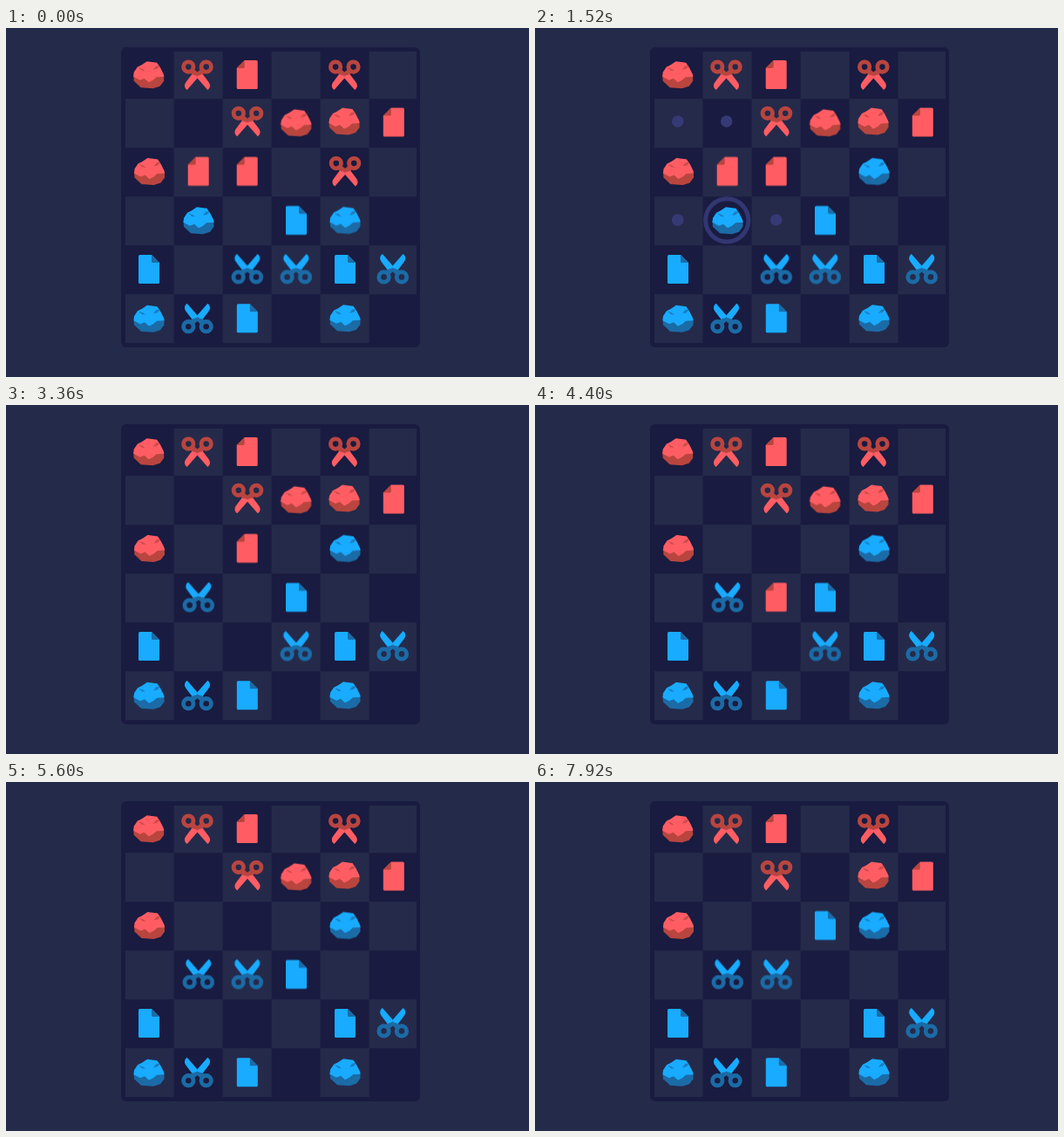
These frames come from a looping animation (600 by 400 pixels, 8 s). An HTML page without scripts:

```html
<!DOCTYPE html>
<html lang="en">
<head>
<meta charset="utf-8">
<title>Rock paper scissors board</title>
<style>
html, body { margin: 0; width: 100%; height: 100%; overflow: hidden; background: #242a49; }
svg { display: block; width: 600px; height: 400px; }

.red { color: #ff5d63; --shade: #b9453f; }
.blue { color: #18abff; --shade: #1b6ba6; }
.light { fill: currentColor; }
.shade { fill: var(--shade); }
.loop { stroke: var(--shade); stroke-width: 4.8; fill: none; }

.hint { fill: #353a76; visibility: hidden; }
.ring { fill: none; stroke: #323772; stroke-width: 5; }

/* Every turn cuts hard: hints show, then the piece jumps and captures. */
.act { animation: 8s step-end -4ms infinite; }
.hint.t1 { animation-name: hint1; }
.hint.t2 { animation-name: hint2; }
.hint.t3 { animation-name: hint3; }
.hint.t4 { animation-name: hint4; }
.hint.t5 { animation-name: hint5; }
.hint.t6 { animation-name: hint6; }
.hint.t7 { animation-name: hint7; }
@keyframes hint1 { 0% { visibility: hidden } 1% { visibility: visible } 9% { visibility: hidden } }
@keyframes hint2 { 0% { visibility: hidden } 19% { visibility: visible } 24% { visibility: hidden } }
@keyframes hint3 { 0% { visibility: hidden } 29% { visibility: visible } 39% { visibility: hidden } }
@keyframes hint4 { 0% { visibility: hidden } 48% { visibility: visible } 55% { visibility: hidden } }
@keyframes hint5 { 0% { visibility: hidden } 63% { visibility: visible } 70% { visibility: hidden } }
@keyframes hint6 { 0% { visibility: hidden } 77% { visibility: visible } 83% { visibility: hidden } }
@keyframes hint7 { 0% { visibility: hidden } 91% { visibility: visible } 98% { visibility: hidden } }

.move1 { animation-name: move1; }
.move2 { animation-name: move2; }
.move3 { animation-name: move3; }
.move4 { animation-name: move4; }
.move5 { animation-name: move5; }
.move6 { animation-name: move6; }
.move7 { animation-name: move7; }
.lost1 { animation-name: lost1; }
.lost2 { animation-name: lost2; }
@keyframes move1 { 0% { transform: none } 9% { transform: translate(0, -56px) } }
@keyframes move2 {
  0% { transform: none; visibility: visible }
  24% { transform: translate(0, 56px); visibility: visible }
  39% { transform: translate(0, 56px); visibility: hidden }
}
@keyframes move3 { 0% { transform: none } 39% { transform: translate(-56px, -56px) } }
@keyframes move4 {
  0% { transform: none; visibility: visible }
  55% { transform: translate(0, 56px); visibility: visible }
  70% { transform: translate(0, 56px); visibility: hidden }
}
@keyframes move5 { 0% { transform: none } 70% { transform: translate(-56px, -56px) } }
@keyframes move6 {
  0% { transform: none; visibility: visible }
  83% { transform: translate(0, 56px); visibility: visible }
  98% { transform: translate(0, 56px); visibility: hidden }
}
@keyframes move7 { 0% { transform: none } 98% { transform: translate(0, -56px) } }
@keyframes lost1 { 0% { visibility: visible } 9% { visibility: hidden } }
@keyframes lost2 { 0% { visibility: visible } 24% { visibility: hidden } }
</style>
</head>
<body>
<svg viewBox="0 0 600 400">
  <defs>
    <pattern id="checker" x="136.6" y="25.2" width="112" height="112" patternUnits="userSpaceOnUse">
      <path fill="#252a4a" d="M56 0h56v56h-56zM0 56h56v56h-56z"/>
    </pattern>
    <g id="rock">
      <path class="shade" d="M-17.5 0L-17 7-9 14.5 5 15.5 13 13 17.5 7 17.5 0Z"/>
      <path class="light" d="M-17.5 2L-17-3-13-9-8-11.5-2-15.5 9.5-14 13.5-8 17-1 17.5 2 9 2.5 5 6 0 8.5-5 4-10 6Z"/>
      <path class="shade" opacity=".7" d="M5-6L8-10 13-11 10-7ZM-12-8.5L-7-7-4-4.5-8-5Z"/>
    </g>
    <g id="paper">
      <path class="light" d="M-10.5-16.5H3L12-7.5V15q0 1.5-1.5 1.5h-21q-1.5 0-1.5-1.5V-15q0-1.5 1.5-1.5Z"/>
      <path class="shade" d="M3-16.5L12-7.5H4.5Q3-7.5 3-9Z"/>
    </g>
    <g id="scissors">
      <path class="shade" d="M-5-1L0-4 5-1 10 4 6 8 0 3-6 8-10 4Z"/>
      <circle class="loop" cx="-10.2" cy="8.9" r="5.7"/>
      <circle class="loop" cx="10.2" cy="8.9" r="5.7"/>
      <path id="blade" class="light" d="M-11.8-17.5C-15.2-15-15.2-11.5-13-8.5L-6.2 .5 0-1.5V-4Z"/>
      <use href="#blade" transform="scale(-1 1)"/>
    </g>
    <g id="paper-flip"><use href="#paper" transform="scale(-1 1)"/></g>
    <g id="scissors-flip"><use href="#scissors" transform="scale(1 -1)"/></g>
    <circle id="dot" r="6.8"/>
    <circle id="ring" class="ring" r="24.6"/>
  </defs>

  <rect x="132" y="22" width="343" height="344" rx="6" fill="#191b40"/>
  <rect x="137" y="27" width="334" height="334" fill="url(#checker)"/>

  <g class="act hint t1">
    <use href="#dot" x="332" y="164"/><use href="#dot" x="444" y="164"/>
    <use href="#dot" x="444" y="220"/><use href="#ring" x="388" y="165"/>
  </g>
  <g class="act hint t2">
    <use href="#dot" x="163.7" y="107"/><use href="#dot" x="219.7" y="107"/>
    <use href="#dot" x="163.7" y="220"/><use href="#dot" x="276.7" y="220"/>
    <use href="#ring" x="220.3" y="220.3"/>
  </g>
  <g class="act hint t3">
    <use href="#dot" x="276.7" y="220"/><use href="#dot" x="220" y="277"/>
    <use href="#dot" x="332" y="333"/><use href="#ring" x="220.3" y="220.3"/>
  </g>
  <g class="act hint t4">
    <use href="#dot" x="219.7" y="107"/><use href="#dot" x="220" y="164"/>
    <use href="#dot" x="332" y="164"/><use href="#dot" x="276.7" y="220"/>
  </g>
  <g class="act hint t5">
    <use href="#dot" x="388" y="220"/><use href="#dot" x="276.7" y="277"/>
    <use href="#dot" x="332" y="333"/><use href="#ring" x="276.5" y="220.3"/>
  </g>
  <g class="act hint t6">
    <use href="#dot" x="332" y="54"/><use href="#dot" x="276.7" y="164"/>
    <use href="#dot" x="332" y="164"/>
  </g>
  <g class="act hint t7">
    <use href="#dot" x="276.7" y="164"/><use href="#dot" x="388" y="220"/>
    <use href="#dot" x="276.7" y="277"/><use href="#dot" x="332" y="277"/>
    <use href="#ring" x="332.5" y="165"/>
  </g>

  <g class="red">
    <use href="#rock" x="163.7" y="53.7"/>
    <use href="#scissors-flip" x="219.5" y="53.5"/>
    <use href="#paper-flip" x="276.7" y="53.5"/>
    <use href="#scissors-flip" x="388.3" y="53.5"/>
    <use href="#scissors-flip" x="277" y="106.7"/>
    <use href="#rock" x="388" y="107"/>
    <use href="#paper-flip" x="444.8" y="108"/>
    <use href="#rock" x="164.5" y="164.5"/>
    <use href="#scissors-flip" x="389" y="164" class="act lost1"/>
    <use href="#paper-flip" x="220.7" y="164.3" class="act move2"/>
    <use href="#paper-flip" x="276.7" y="164.3" class="act move4"/>
    <use href="#rock" x="332.7" y="108.7" class="act move6"/>
  </g>
  <g class="blue">
    <use href="#paper" x="164" y="276.5"/>
    <use href="#paper" x="389" y="276.5"/>
    <use href="#scissors" x="443.7" y="276.5"/>
    <use href="#rock" x="164" y="333.3"/>
    <use href="#scissors" x="219.5" y="333.3"/>
    <use href="#paper" x="276.8" y="332.7"/>
    <use href="#rock" x="389" y="332.8"/>
    <use href="#rock" x="221" y="220.7" class="act lost2"/>
    <use href="#rock" x="389" y="220.5" class="act move1"/>
    <use href="#scissors" x="276.8" y="276.5" class="act move3"/>
    <use href="#scissors" x="332.8" y="276.5" class="act move5"/>
    <use href="#paper" x="333" y="220.5" class="act move7"/>
  </g>
</svg>
</body>
</html>
```
